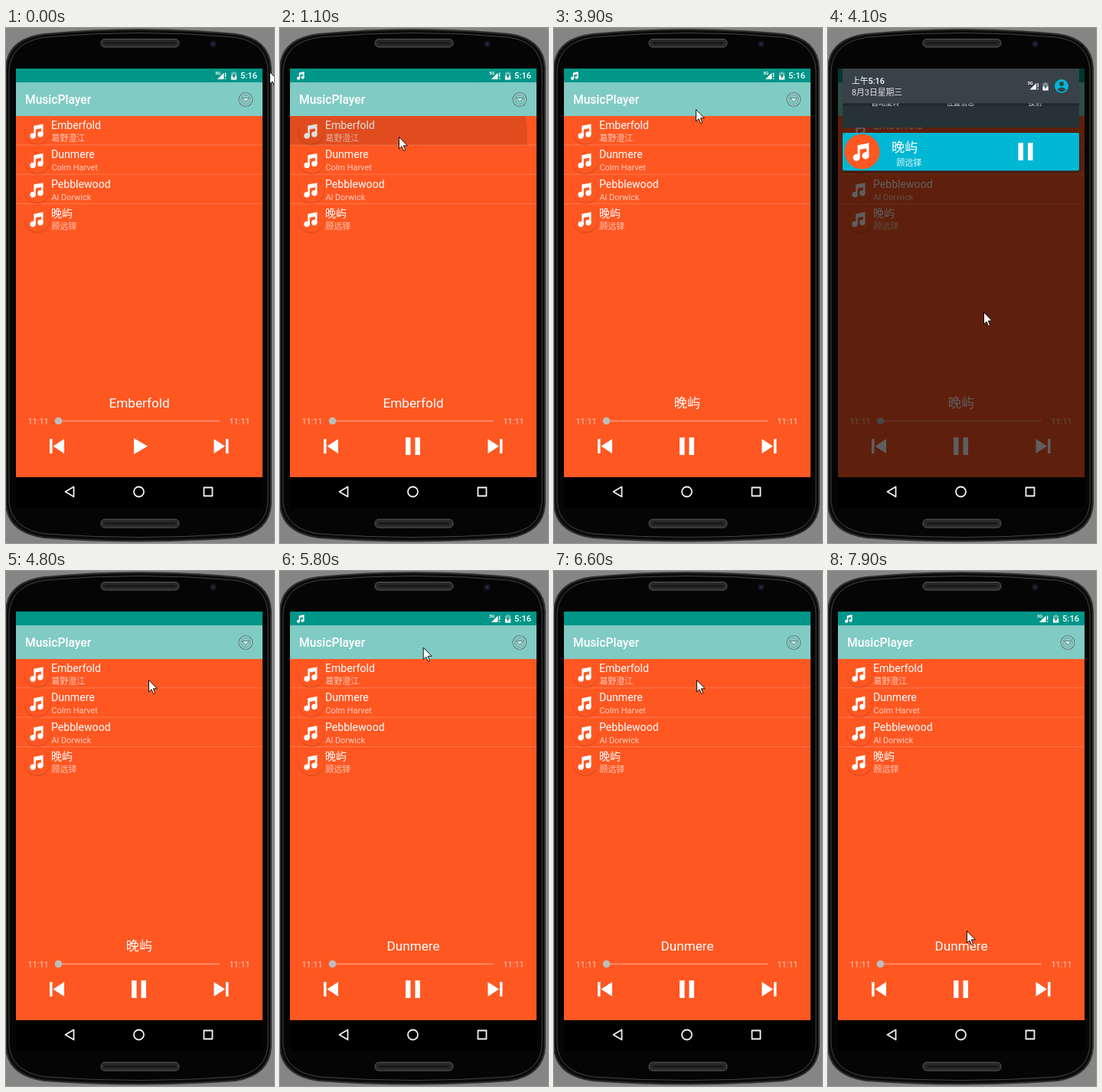
These frames come from a looping animation (350x673 px, 8 s). An HTML page:

```html
<!DOCTYPE html>
<html lang="en">
<head>
<meta charset="utf-8">
<title>MusicPlayer</title>
<style>
html, body { margin: 0; width: 100%; height: 100%; overflow: hidden; background: #858585; }
svg { display: block; width: 350px; height: 673px; }
text { font-family: Roboto, "Noto Sans CJK SC", "Noto Sans CJK", sans-serif; fill: #fff; white-space: pre; }
.mid { text-anchor: middle; }
.name { font-size: 14.1px; }
.artist { font-size: 10.9px; fill-opacity: .7; }
.big { font-size: 17.2px; }
.med { font-weight: 500; }
</style>
</head>
<body>
<svg viewBox="0 0 350 673">
  <defs>
    <clipPath id="screen"><rect x="13" y="53" width="322" height="535"/></clipPath>
    <clipPath id="rowClip"><rect id="rowBox" x="13" width="322" height="38"/></clipPath>
    <linearGradient id="fall" x2="0" y2="1">
      <stop offset="0" stop-opacity=".35"/><stop offset="1" stop-opacity="0"/>
    </linearGradient>
    <filter id="soft" x="-20%" y="-20%" width="140%" height="150%"><feGaussianBlur stdDeviation="1"/></filter>
    <g id="note" fill="#fff">
      <circle cx="-5.2" cy="6" r="3.7"/><circle cx="4.6" cy="4" r="3.7"/>
      <path d="M-4-7.2 8.2-9.6V4H5.6V-3.8L-1.5-2.4V6H-4Z"/>
    </g>
    <path id="pause" d="M-9.500-11.500H-3v23H-9.500zM3-11.500H9.500v23H3z" fill="#fff"/>
    <path id="skip" d="M57 537h3.500v19H57zM76 537V556L61.500 546.500Z" fill="#fff"/>
    <g id="signal" fill="#fff">
      <text y="4.200" font-size="5.800" font-weight="700">3G</text>
      <path d="M3 10.500 11.500 2V10.500Z"/><path d="M13 2h1.300v5.600H13zM13 9h1.300v1.500H13z"/>
    </g>
    <g id="battery" fill="#fff">
      <path d="M2.200 0h2.800v1.300h2.200v9.200H0V1.300h2.200z" fill-opacity=".4"/>
      <path d="M0 5.500H7.200v5H0z"/>
      <path d="M4.200 2.600 1.700 6.600h1.600L2.900 9.400 5.600 5.200H4Z" fill="#1c6a62"/>
    </g>
  </defs>

  <!-- handset -->
  <path d="M0 52Q2 14 50 8Q175-4 300 8Q344 14 346 52V622Q344 659 300 666Q175 675 50 666Q2 659 0 622Z"
        fill="#0b0b0b" stroke="#303030" stroke-width="2"/>
  <path d="M4 55Q7 18 52 12Q175 1 298 12Q340 18 342 55V619Q340 655 298 661Q175 670 52 661Q7 655 4 619Z"
        fill="#050505" stroke="#424242"/>
  <g fill="#292929" stroke="#565656">
    <rect x="124" y="14.500" width="102" height="10.500" rx="5"/>
    <rect x="124" y="642" width="102" height="11" rx="5"/>
  </g>
  <path d="M129 19.500H221M129 647.500H221" stroke="#191919" stroke-width="3"/>
  <circle cx="270.500" cy="21" r="4.500" fill="#12141c"/><circle cx="270.500" cy="21" r="2" fill="#242a48"/>
  <rect x="13" y="53" width="322" height="574"/>
  <g fill="none" stroke="#f2f2f2" stroke-width="1.800" stroke-linejoin="round">
    <path d="M77.500 606 88.500 599.500V612.500Z"/><circle cx="173.500" cy="606" r="6.500"/>
    <rect x="258.500" y="600.500" width="11" height="11"/>
  </g>

  <g clip-path="url(#screen)">
    <rect x="13" y="53" width="322" height="534" fill="#ff5722"/>
    <rect x="13" y="53" width="322" height="18" fill="#009688"/>
    <rect x="13" y="71" width="322" height="44" fill="#80cbc4"/>
    <g id="status">
      <use id="mini" href="#note" transform="translate(27 62.500) scale(.56)"/>
      <use href="#signal" x="273" y="56.500"/><use href="#battery" x="294" y="57"/>
      <text class="med" x="306" y="66.300" font-size="11.300">5:16</text>
    </g>
    <text class="med" x="25" y="99" font-size="15.600">MusicPlayer</text>
    <g fill="none" stroke="#56837f">
      <circle cx="313" cy="93.500" r="8.800" stroke-width="1.200"/>
      <circle cx="313" cy="93.500" r="7.500" stroke="#c9e6e3"/>
      <circle cx="313" cy="93.500" r="6.500" stroke-width=".7"/>
      <path d="M308.500 91.500H317.500L313 96.500Z" fill="#e4f3f1"/>
    </g>

    <g id="list"></g>
    <g clip-path="url(#rowClip)"><circle id="ripple"/></g>

    <text id="song" class="mid big" x="174" y="495.600"></text>
    <text class="artist" x="28.500" y="518">11:11</text>
    <text class="artist" x="291.500" y="518">11:11</text>
    <path d="M68 513.500H279" stroke="#fff" stroke-opacity=".38" stroke-width="1.500"/>
    <circle cx="68.500" cy="513.500" r="4.800" fill="#bdbdbd"/>
    <use href="#skip"/><use href="#skip" transform="translate(347.500) scale(-1 1)"/>
    <path id="play" d="M167 536V557L185 546.500Z" fill="#fff"/>
    <use id="stop" href="#pause" x="173.500" y="546.500"/>

    <rect id="scrim" x="13" y="53" width="322" height="534"/>
    <g id="shade">
      <rect id="panel" x="19" y="53" width="309" fill="#263238"/>
      <g id="tiles" class="mid" font-size="9.300">
        <text x="75">自动旋转</text><text x="173">位置信息</text><text x="270.500">投射</text>
      </g>
      <rect x="19" y="98" width="309" height="5" fill="url(#fall)"/>
      <rect x="19" y="-60" width="309" height="158.500" fill="#384248"/>
      <text class="med" x="31" y="72.500" font-size="10.800">上午5:16</text>
      <text x="31" y="88.300" font-size="10.800" fill-opacity=".85">8月3日星期三</text>
      <use href="#signal" x="260.500" y="70"/><use href="#battery" x="280.500" y="71"/>
      <circle cx="305" cy="76" r="9" fill="#00b8d4"/>
      <circle cx="305" cy="73" r="2.900" fill="#384248"/>
      <path d="M299.200 80.500Q305 74.500 310.800 80.500Q305 86 299.200 80.500Z" fill="#384248"/>
      <g id="card">
        <rect x="19" y="1" width="309" height="50" rx="2" opacity=".45" filter="url(#soft)"/>
        <rect x="19" width="309" height="49.500" rx="2" fill="#00b8d4"/>
        <circle cx="44.500" cy="24.500" r="23" fill="#ff5722"/>
        <use href="#note" transform="translate(43.500 25) scale(1.220)"/>
        <text id="cardName" class="big" x="83" y="24.500"></text>
        <text id="cardArtist" class="artist" x="89.500" y="42.500" style="fill-opacity:.9"></text>
        <use href="#pause" x="258" y="24.500"/>
      </g>
    </g>
  </g>
  <path id="cursor" d="M.5.5V16L4 12.700 6.500 18.500 8.700 17.500 6.300 11.800H11.300Z" fill="#fff" stroke="#000" stroke-width=".9"/>
</svg>
<script>
const $ = id => document.getElementById(id);
const LOOP = 8000, TICK = 100, PITCH = 38.4, TAP_LAG = 200, RIPPLE = 500;

const songs = [
  ["Emberfold", "葛野澄江"],
  ["Dunmere", "Colm Harvet"],
  ["Pebblewood", "Al Dorwick"],
  ["晚屿", "顾远铎"]
];

// cursor journeys: arrival time, duration, x, y
const moves = [
  [0, 1, 344, 57], [700, 700, 155, 142], [1700, 400, 168, 486], [2200, 300, 125, 227],
  [2300, 100, 118, 243], [3300, 400, 200, 316], [3600, 300, 191, 52], [3900, 200, 185, 106],
  [4100, 200, 203, 371], [4500, 300, 186, 142], [5100, 200, 88, 171], [5600, 100, 185, 62],
  [6100, 400, 196, 302], [6400, 200, 186, 142], [7200, 500, 170, 631], [7500, 200, 167, 606],
  [7900, 400, 181, 470]
];
const taps = [{ time: 900, row: 0 }, { time: 2500, row: 3 }, { time: 5100, row: 1 }];
const drags = [{ from: 3900, drop: 4200, close: 4700 }, { from: 5800, drop: 6200, close: 6500 }];

const clamp = v => Math.max(0, Math.min(1, v));
const ease = f => f * f * (3 - 2 * f);
const show = (id, on) => $(id).setAttribute("visibility", on ? "visible" : "hidden");
const move = (id, x, y) => $(id).setAttribute("transform", `translate(${x} ${y})`);

function cursorAt(t) {
  let x = 0, y = 0;
  for (const [end, span, toX, toY] of moves) {
    const f = ease(clamp((t - end + span) / span));
    x += (toX - x) * f;
    y += (toY - y) * f;
  }
  return { x, y };
}

// The shade follows the cursor, springs back on release, then slides shut.
function shadeAt(t) {
  const drag = drags.find(d => t > d.from && t <= d.close + TICK);
  if (!drag) return { open: 0, extra: 0 };
  const { y } = cursorAt(Math.min(t, drag.drop));
  const back = clamp((t - drag.drop) / 200);
  const shut = clamp((t - drag.close + TICK) / 200);
  return {
    open: clamp((y - 62) / 180) * (1 - shut),
    extra: Math.max(0, y - 242) / 4 * (1 - back)
  };
}

$("list").innerHTML = songs.map(([name, artist], i) => {
  const y = 115 + i * PITCH;
  const line = i < 3 ? `<path d="M13 ${y + 37.8}H335" stroke="#fff" stroke-opacity=".2"/>` : "";
  return `${line}<circle cx="41" cy="${y + 21}" r="16" opacity=".3" filter="url(#soft)"/>
    <circle cx="41" cy="${y + 20}" r="16.5" fill="#ff5722"/>
    <use href="#note" x="40.3" y="${y + 20}"/>
    <text class="name" x="59" y="${y + 17}">${name}</text>
    <text class="artist" x="59.5" y="${y + 32.7}">${artist}</text>`;
}).join("");

function drawRipple(t) {
  const tap = taps.find(({ time }) => t >= time && t < time + RIPPLE);
  show("ripple", tap);
  if (!tap) return;
  const f = (t - tap.time + TICK) / RIPPLE;
  const { x, y } = cursorAt(tap.time);
  const c = $("ripple");
  $("rowBox").setAttribute("y", 115 + tap.row * PITCH);
  c.setAttribute("cx", x);
  c.setAttribute("cy", y);
  c.setAttribute("r", 30 + 230 * f);
  c.setAttribute("opacity", .12 * clamp(2.2 * (1.1 - f)));
}

function drawShade(t) {
  const { open, extra } = shadeAt(t);
  $("scrim").setAttribute("opacity", .63 * open);
  show("shade", open > 0);
  move("shade", 0, -110 * (1 - open));
  $("panel").setAttribute("height", 45 + extra);
  move("tiles", 0, 69 + extra);
  move("card", 0, 102.5 + 1.07 * extra);
}

function draw(t) {
  const tapped = taps.filter(({ time }) => t >= time + TAP_LAG);
  const playing = tapped.length > 0;
  const [name, artist] = songs[playing ? tapped.at(-1).row : 0];
  $("song").textContent = $("cardName").textContent = name;
  $("cardArtist").textContent = artist;
  show("play", !playing);
  show("stop", playing);
  show("mini", playing);
  const bare = drags.some(d => t > d.from && t <= d.close + TICK);
  $("status").setAttribute("opacity", bare ? 0 : 1);
  drawRipple(t);
  drawShade(t);
  const { x, y } = cursorAt(t);
  move("cursor", x, y);
}

const begin = performance.now();
function frame(now) {
  const t = Math.max(0, now - begin) % LOOP;
  draw(Math.floor(t / TICK) * TICK);
  requestAnimationFrame(frame);
}
draw(0);
requestAnimationFrame(frame);
</script>
</body>
</html>
```
